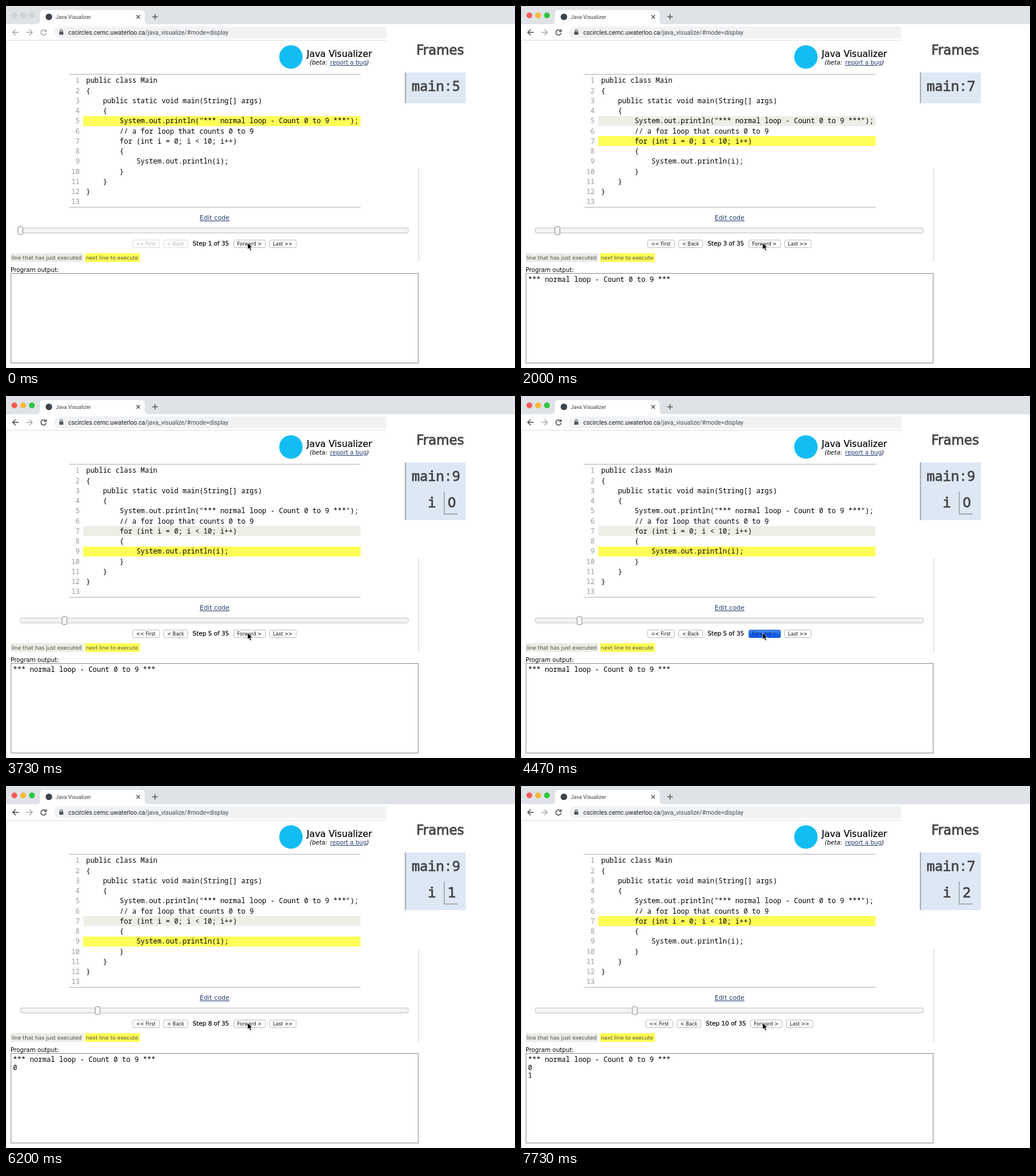
Write an HTML page that moves like this. It is 870x618 px and loops after 8 s.

```html
<!DOCTYPE html>
<html lang="en">
<head>
<meta charset="utf-8">
<title>Java Visualizer</title>
<style>
html, body { margin: 0; width: 100%; height: 100%; overflow: hidden; background: #fff; }
svg { display: block; width: 100vw; height: 100vh; }
text { white-space: pre; font-family: "DejaVu Sans", Verdana, sans-serif; }
.mono { font: 11.95px "Noto Sans Mono", monospace; }
.chrome { font-family: Roboto, sans-serif; }
.link { fill: #253a70; text-decoration: underline; }
.num { fill: #999; text-anchor: end; }
.button rect { fill: #fff; stroke: #bcbcbc; }
.button text { font-size: 8.1px; fill: #111; }
.off rect { stroke: #dcdcdc; }
.off text { fill: #b4b4b4; }
.pressed rect { fill: url(#blue); stroke: #2460c8; }
.pressed text { fill: #0a2470; }
.icon { fill: none; stroke: #54575b; stroke-width: 1.5; }
.zoom { filter: blur(.5px); fill: #444; }
.zoom text { stroke: #444; stroke-width: .8; }
.zoom .mono { font-size: 23px; }
</style>
</head>
<body>
<svg viewBox="0 0 870 618">
  <defs>
    <linearGradient id="blue" x2="0" y2="1">
      <stop stop-color="#4a90f4"/><stop offset=".5" stop-color="#1c69ee"/><stop offset="1" stop-color="#0b55ea"/>
    </linearGradient>
  </defs>
  <rect width="870" height="618" fill="#fff"/>

  <!-- browser window -->
  <rect width="870" height="31" fill="#dfe3e7"/>
  <path d="M52 31q6 0 6-6V13q0-6 6-6H231q6 0 6 6V25q0 6 6 6z" fill="#fff"/>
  <g id="lights" stroke-width=".6"><circle cx="14.3" cy="16" r="4.6"/><circle cx="29.3" cy="16" r="4.6"/><circle cx="44.3" cy="16" r="4.6"/></g>
  <circle cx="73.3" cy="18.5" r="5.6" fill="#3c434b"/>
  <text class="chrome" x="85" y="22" font-size="9" fill="#3c4043">Java Visualizer</text>
  <path class="icon" d="M223 15.5l6 6m0-6l-6 6"/>
  <path class="icon" d="M250 18.5h9.4M254.7 13.8v9.4"/>
  <path class="icon nav" d="M21.5 45H11.5m5-5l-5 5 5 5"/>
  <path class="icon" d="M35 45H45m-5-5l5 5-5 5" style="stroke:#a9abad"/>
  <path class="icon nav" d="M67.6 42.2A4.5 4.5 0 1 0 68.6 46M68.7 39.8v3.6h-3.6"/>
  <path d="M650 35H92a10 10 0 0 0 0 20H650z" fill="#f0f2f4"/>
  <rect x="91" y="43.5" width="7" height="5.5" rx=".8" fill="#54575b"/>
  <path class="icon" d="M92.6 44V42.3a1.9 1.9 0 0 1 3.8 0V44" style="stroke-width:1.1"/>
  <text class="chrome" x="106.5" y="48.6" font-size="10.35" fill="#1c1e21">cscircles.cemc.uwaterloo.ca<tspan fill="#484c51">/java_visualize/#mode=display</tspan></text>
  <path d="M0 58.5H650" stroke="#dadcde"/>
  <path d="M.5 59V618" stroke="#e2e2e2"/>

  <!-- page heading -->
  <circle cx="487" cy="87" r="20" fill="#12bdf3"/>
  <text x="514" y="87" font-size="15.4" stroke="#000" stroke-width=".2">Java Visualizer</text>
  <g font-size="10.1">
    <text x="519" y="100" font-style="italic">(beta:</text>
    <text x="554" y="100" class="link">report a bug</text>
    <text x="616.5" y="100" font-style="italic">)</text>
  </g>

  <!-- code -->
  <rect id="prev" x="132" width="474" height="17" fill="#eeeee7"/>
  <rect id="next" x="132" width="474" height="17" fill="#ffff58"/>
  <path d="M108 116.5H606M108 343.5H606" stroke="#adadad"/>
  <g id="code"></g>
  <text class="link" x="331" y="365.3" font-size="10.95">Edit code</text>

  <!-- controls -->
  <rect x="24.5" y="379" width="663" height="8.5" rx="2" fill="#f3f3f3" stroke="#c2c2c2"/>
  <rect id="handle" y="376.8" width="8.4" height="13.4" rx="2" fill="#f7f7f7" stroke="#858585"/>
  <g id="left">
    <g class="button back"><rect x="216.5" y="399.5" width="46" height="13" rx="2.5"/><text x="222.5" y="409">&lt;&lt; First</text></g>
    <g class="button back"><rect x="269.5" y="399.5" width="41" height="13" rx="2.5"/><text x="275.5" y="409">&lt; Back</text></g>
    <text id="step" x="319" y="409.3" font-size="10.2" stroke="#000" stroke-width=".2"></text>
  </g>
  <g id="right">
    <g class="button" id="forward"><rect x="389.5" y="399.5" width="54" height="13" rx="2.5"/><text x="395" y="409">Forward &gt;</text></g>
    <g class="button"><rect x="450.5" y="399.5" width="45.5" height="13" rx="2.5"/><text x="456.5" y="409">Last &gt;&gt;</text></g>
  </g>
  <path d="M413 404.2V415.6l2.6-2.4 1.9 4.4 2-.9-1.9-4.2h3.5z" stroke="#fff" stroke-width=".7"/>

  <!-- legend and output -->
  <rect x="8" y="422" width="124" height="15" fill="#ebebe7"/>
  <rect x="135" y="422" width="94" height="15" fill="#ffff58"/>
  <g font-size="9" fill="#4c4c40"><text x="9.5" y="432.7">line that has just executed</text><text x="136.5" y="432.7">next line to execute</text></g>
  <text x="8" y="453.7" font-size="10.1">Program output:</text>
  <rect x="8.5" y="456.5" width="696" height="153" fill="#fff" stroke="#8a8a8a"/>
  <g id="output"></g>
  <path d="M705.5 277V437" stroke="#d0d0d0"/>

  <!-- enlarged stack frame -->
  <g class="zoom">
    <text x="701.5" y="83" font-size="22.4">Frames</text>
    <rect id="panel" x="682" y="113.5" width="104" fill="#dee8f5"/>
    <rect id="edge" x="681.7" y="113.5" width="2" fill="#a3a6af"/>
    <text id="line" class="mono" x="693.5" y="145"></text>
    <g id="local">
      <text class="mono" x="728" y="190.3" text-anchor="middle">i</text>
      <path d="M749 163V201.5H772" fill="none" stroke="#a6a9ae" stroke-width="1.8"/>
      <text id="value" x="762" y="190.3" font-size="23" text-anchor="middle"></text>
    </g>
  </g>
</svg>
<script>
const $ = id => document.getElementById(id);
const set = (el, attrs) => { for (const k in attrs) el.setAttribute(k, attrs[k]); };
const addText = (parent, x, y, text, cls = 'mono') => {
  const el = document.createElementNS('http://www.w3.org/2000/svg', 'text');
  set(el, { x, y, class: cls });
  el.textContent = text;
  parent.append(el);
};

const code = `public class Main
{
    public static void main(String[] args)
    {
        System.out.println("*** normal loop - Count 0 to 9 ***");
        // a for loop that counts 0 to 9
        for (int i = 0; i < 10; i++)
        {
            System.out.println(i);
        }
    }
}
`.split('\n');
code.forEach((text, n) => {
  const y = 131.3 + 17.25 * n;
  addText($('code'), 126, y, n + 1, 'mono num');
  addText($('code'), 137, y, text);
});
['*** normal loop - Count 0 to 9 ***', '0', '1'].forEach((text, n) =>
  addText($('output'), 12, 471 + 13.5 * n, text));

const LOOP = 8000, ACTIVE = 200;
const presses = [1000, 1800, 2670, 3600, 4470, 5330, 6000, 6800, 7530];
const releases = [1130, 2000, 2870, 3730, 4600, 5470, 6200, 6930, 7730];
// per step: next line, line just executed, value of i
const states = [[5, 0], [5, 0], [7, 5], [7, 0, 0], [9, 7, 0], [7, 9, 0], [7, 0, 1], [9, 7, 1], [7, 9, 1], [7, 0, 2]];
const countPast = (times, t) => times.filter(at => at <= t).length;

function markLine(el, line) {
  set(el, { y: Math.round(187.7 + 17.25 * (line - 5)), visibility: line ? 'visible' : 'hidden' });
}

function draw(t) {
  const active = t >= ACTIVE;
  const done = countPast(releases, t), step = done + 1;
  const [next, prev, i] = states[done];

  const fills = ['#fc5b57', '#fdbc2f', '#2bc840'], rims = ['#e2463f', '#e0a024', '#1fa92f'];
  [...$('lights').children].forEach((el, n) =>
    set(el, { fill: active ? fills[n] : '#d2d5d7', stroke: active ? rims[n] : '#bfc3c5' }));
  document.querySelectorAll('.nav').forEach(el => el.style.stroke = active ? '#46494d' : '#a2a4a6');

  markLine($('next'), next);
  markLine($('prev'), prev);
  set($('handle'), { x: 20.4 + 18.87 * done });
  $('step').textContent = `Step ${step} of 35`;
  const shift = step > 9 ? 3 : 0;
  set($('left'), { transform: `translate(${-shift})` });
  set($('right'), { transform: `translate(${shift})` });
  document.querySelectorAll('.back').forEach(el => el.classList.toggle('off', step === 1));
  $('forward').classList.toggle('pressed', countPast(presses, t) > done);

  const lines = Math.floor(step / 3);
  [...$('output').children].forEach((el, n) => set(el, { visibility: n < lines ? 'visible' : 'hidden' }));

  const hasLocal = i !== undefined, height = hasLocal ? 98.5 : 52.5;
  set($('panel'), { height });
  set($('edge'), { height });
  set($('local'), { visibility: hasLocal ? 'visible' : 'hidden' });
  $('line').textContent = `main:${next}`;
  $('value').textContent = hasLocal ? i : '';
}

const start = performance.now();
function tick() {
  draw((performance.now() - start) % LOOP);
  requestAnimationFrame(tick);
}
tick();
</script>
</body>
</html>
```
